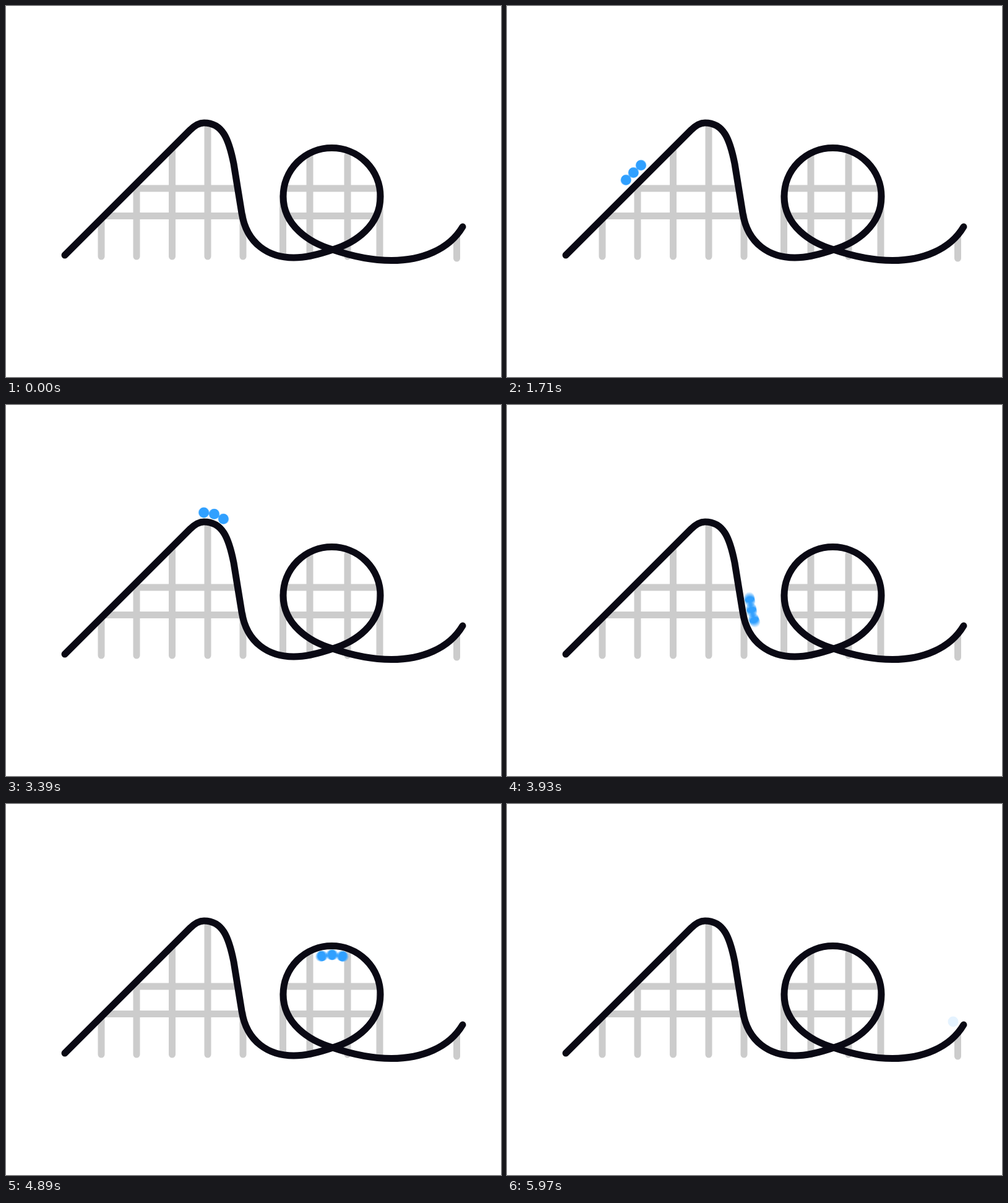
An HTML page with a canvas for the animation above (6000 ms loop, 800x600 px).

```html
<!DOCTYPE html>
<html lang="en">
<head>
<meta charset="utf-8">
<title>Roller coaster</title>
<style>
  html, body { margin: 0; width: 100%; height: 100%; overflow: hidden; background: #fff; }
  canvas { display: block; }
</style>
</head>
<body>
<canvas id="stage" width="800" height="600"></canvas>
<script>
const LOOP = 6000, STEP = 30;
const SHUTTER = 16, SAMPLES = 16;
const RADIUS = 8.5, GAP = 17, CARS = 3;

const supports = new Path2D(`
  M154 348V405 M211 296V405 M268.5 233V405 M326 196V405 M383 340V405
  M447.5 308V405 M491 242V405 M552 242V405 M604 308V405 M728.5 373V408
  M211 295H373 M162 339.5H383 M452 295H604 M455 339.5H598`);

const track = new Path2D(`
  M95 403L297 201C304 194 312 189 320 189
  C350 189 360 215 368 255C373 285 377 310 381 335
  C389 385 425 407 465 407C487 407 508 401 528 394
  C565 383 605 355 605 308A78.5 78.5 0 0 0 448 308
  C448 355 490 383 528 394C560 405 590 411.5 623 411.5
  C672 411.5 716 394 738 357`);

// The cars follow their own line beside the track.
const ride = document.createElementNS('http://www.w3.org/2000/svg', 'path');
ride.setAttribute('d', `
  M82 389.8L286 189.2C296 179.5 308 174 320 174
  C362 174 373 212 382 253C387 283 391 308 395.5 333
  C402 373 435 392 465 392C485 392 505 386 524 380
  C560 368 590.5 342 590.5 308A64 64 0 0 0 462.5 308
  C462.5 345 498 370 532 380C562 390.5 592 397 623 397
  C665 397 703 383 721 352`);
const rideLength = ride.getTotalLength();

function nearestLength(x, y) {
  let best = 0, min = Infinity;
  for (let s = 0; s <= rideLength; s += 0.5) {
    const p = ride.getPointAtLength(s);
    const d = Math.hypot(p.x - x, p.y - y);
    if (d < min) { min = d; best = s; }
  }
  return best;
}

// Lead car: time in ms, place, speed in px/ms
const knots = [
  [57, 82, 389.8, 0.114],
  [2550, 285, 190.2, 0.114],
  [3180, 336, 176.3, 0.078],
  [3390, 351, 184.5, 0.1],
  [3810, 388.3, 289, 0.46],
  [4470, 588.2, 291, 0.3],
  [5070, 465.8, 287.8, 0.45],
  [5280, 535, 382, 0.68],
  [5700, 714.5, 361, 0.3],
].map(([t, x, y, v]) => ({ t, s: nearestLength(x, y), v }));
knots.push({ t: 5970, s: rideLength + (CARS - 1) * GAP + 0.45, v: 0.07 });

// Cubic Hermite interpolation of the distance travelled
function distance(t) {
  let i = 0;
  while (i < knots.length - 2 && t > knots[i + 1].t) i++;
  const a = knots[i], b = knots[i + 1], h = b.t - a.t, u = (t - a.t) / h;
  const ease = u * u * (3 - 2 * u);
  return a.s + (b.s - a.s) * ease
    + h * u * (1 - u) * (a.v * (1 - u) - b.v * u);
}

const ctx = document.getElementById('stage').getContext('2d');
const layer = document.createElement('canvas');
layer.width = 800;
layer.height = 600;
const cars = layer.getContext('2d');
cars.fillStyle = '#2ea3ff';
cars.globalAlpha = 1 / SAMPLES;
cars.globalCompositeOperation = 'lighter';

// Adds up several moments within the shutter time for motion blur.
function drawCars(t) {
  cars.clearRect(0, 0, 800, 600);
  for (let k = 0; k < SAMPLES; k++) {
    const lead = distance(t + ((k + 0.5) / SAMPLES - 0.5) * SHUTTER);
    for (let car = 0; car < CARS; car++) {
      const s = lead - car * GAP;
      if (s < 0 || s > rideLength) continue;
      const p = ride.getPointAtLength(s);
      cars.beginPath();
      cars.arc(p.x, p.y, RADIUS, 0, 2 * Math.PI);
      cars.fill();
    }
  }
}

function stroke(path, color) {
  ctx.strokeStyle = color;
  ctx.stroke(path);
}

function draw(t) {
  ctx.fillStyle = '#fff';
  ctx.fillRect(0, 0, 800, 600);
  ctx.lineWidth = 11;
  ctx.lineCap = ctx.lineJoin = 'round';
  stroke(supports, '#ccc');
  drawCars(t);
  ctx.drawImage(layer, 0, 0);
  stroke(track, '#0a0914');
}

const start = performance.now();
function frame() {
  const t = (performance.now() - start) % LOOP;
  draw(Math.floor(t / STEP) * STEP);
  requestAnimationFrame(frame);
}
frame();
</script>
</body>
</html>
```
